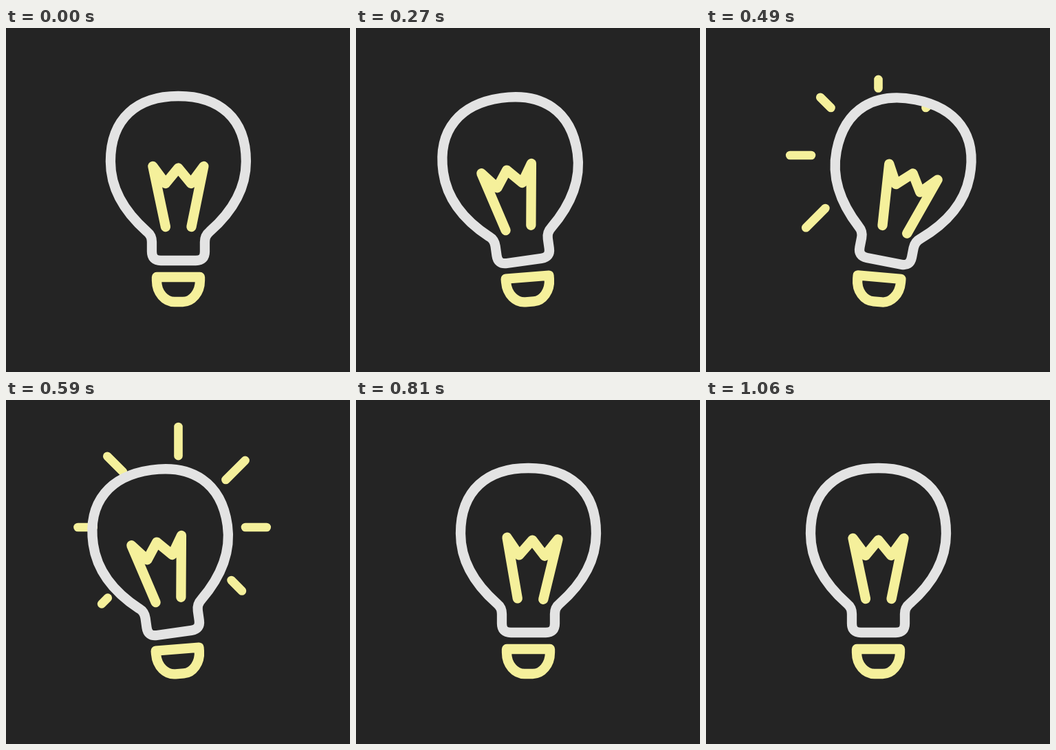
Recreate the animation shown at these times as an HTML page. Size 500 by 500 pixels, loop 1.11 s.

```html
<!DOCTYPE html>
<html lang="en">
<head>
<meta charset="utf-8">
<title>Light bulb</title>
<style>
  html, body { margin: 0; width: 100%; height: 100%; overflow: hidden; background: #242424; }
  svg { display: block; width: 100%; height: 100%; }
  path { fill: none; stroke: #f5f09b; stroke-width: 14.3; stroke-linecap: round; stroke-linejoin: round; }
  #glass { stroke: #e3e3e3; }
  #rays path { stroke-width: 12.6; }
</style>
</head>
<body>
<svg viewBox="0 0 500 500">
  <g id="rays"></g>
  <path id="glass" d="M250.5 99C191 99 152 131 152 194C152 240 180 274 205 296C210 300 212 305 212 311V325Q212 338 225 338H276Q289 338 289 325V311C289 305 291 300 296 296C321 274 349 240 349 194C349 131 310 99 250.5 99Z"/>
  <path id="filament" d="M232 289L213.5 201L232 226L250.5 203.500L269 226L287.500 201L269.500 289"/>
  <path id="socket" d="M219 362H282V367C282 385 270 398 257 398H245C231 398 219 385 219 367Z"/>
</svg>
<script>
const LOOP = 1110;
const CX = 250.5;
const $ = id => document.getElementById(id);
const clamp = v => Math.min(1, Math.max(0, v));

// Rises from a to b, holds until c, falls to 0 at d.
const hump = (t, a, b, c, d) => clamp(Math.min((t - a) / (b - a), (d - t) / (d - c)));

// Each part leans left, swings right by span degrees and returns, about its own pivot.
const parts = [
  { el: $('glass'), pivot: 381, lean: 8.1, span: 30, rebound: 0 },
  { el: $('filament'), pivot: 365, lean: 11.3, span: 46, rebound: 2.6 },
  { el: $('socket'), pivot: 380, lean: 4.6, span: 15, rebound: 0 }
];

// Rays appear clockwise from the lower left; the lowest pair sits further out.
const rays = Array.from({ length: 7 }, (_, i) => {
  const el = document.createElementNS('http://www.w3.org/2000/svg', 'path');
  $('rays').append(el);
  return { el, angle: (3 + i) * Math.PI / 4, inner: i % 6 ? 97.5 : 109 };
});

function draw(t) {
  const left = hump(t, 0, 270, 590, 750);
  const rise = hump(t, 270, 435, 435, 590);
  const right = t < 435 ? rise ** 1.25 : rise;
  const back = hump(t, 590, 750, 750, 1060);

  for (const { el, pivot, lean, span, rebound } of parts) {
    const angle = span * right - lean * left + rebound * back;
    el.setAttribute('transform', `rotate(${angle} ${CX} ${pivot})`);
  }

  rays.forEach(({ el, angle, inner }, i) => {
    const head = clamp((t - 381 - 25 * i) / 134);
    const tail = clamp((t - 500 - 25 * i) / 122);
    const point = p => {
      const r = inner + 48.5 * p;
      return `${CX + r * Math.cos(angle)} ${185 + r * Math.sin(angle)}`;
    };
    el.setAttribute('d', head > tail ? `M${point(tail)}L${point(head)}` : '');
  });
}

function tick() {
  draw(performance.now() % LOOP);
  requestAnimationFrame(tick);
}
tick();
</script>
</body>
</html>
```
